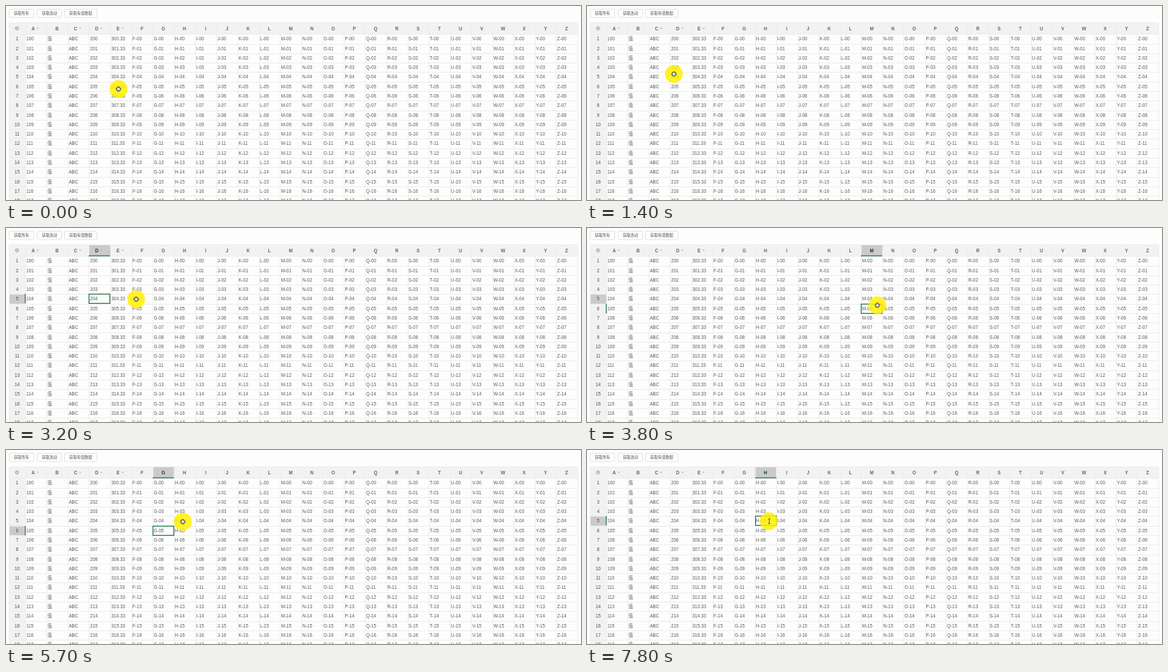
These frames come from a looping animation (800x271 px, 8000 ms). An HTML page with a canvas:

```html
<!DOCTYPE html>
<html>
<head>
<meta charset="utf-8">
<style>
html, body { margin: 0; width: 100%; height: 100%; overflow: hidden; background: #fff; }
canvas { display: block; }
</style>
</head>
<body>
<canvas id="stage" width="800" height="271"></canvas>
<script>
const ctx = document.getElementById('stage').getContext('2d');
const LOOP = 8000, STEP = 100, EDIT_AT = 6500;
const LEFT = 5, COL0 = 26.8, COL_W = 29.54, TOP = 24, ROW0 = 39.3, ROW_H = 13.28;
const COLS = 26, ROWS = 18;
const GREEN = '#217346', LINE = '#eeedee', HEAD = '#f3f2f3', ACTIVE = '#cacaca';
const LATIN = '"Liberation Sans", Arial, sans-serif';
const CJK = '"Noto Sans CJK SC", "Noto Sans CJK", sans-serif';

// key points of the pointer: time, x, y
const path = [
  [0, 156.5, 116], [400, 169, 111], [800, 164, 109], [1100, 164, 109],
  [1400, 121, 95], [2600, 122, 96.7], [3400, 192, 100], [3800, 404, 108],
  [4300, 372, 144], [4700, 209.5, 107.3], [5200, 249, 100.5], [5700, 246, 100.2],
  [6600, 250, 105], [7000, 252, 99.5], [LOOP, 253, 99.5]
];
// each click selects the cell under the pointer
const clicks = [1900, 3800, 4300, 4700, 5900];

const colX = c => COL0 + c * COL_W;
const rowY = r => ROW0 + r * ROW_H;
const letter = c => String.fromCharCode(65 + c);

function pointer(t) {
  const i = path.findIndex(p => p[0] > t);
  const [t0, x0, y0] = path[i - 1], [t1, x1, y1] = path[i];
  const u = (t - t0) / (t1 - t0), e = u * u * (3 - 2 * u);
  return [x0 + (x1 - x0) * e, y0 + (y1 - y0) * e];
}

function selectedAt(t) {
  const click = clicks.filter(c => c <= t).pop();
  if (!click) return null;
  const [x, y] = pointer(click);
  return { col: Math.floor((x - COL0) / COL_W), row: Math.floor((y - ROW0) / ROW_H) };
}

function rect(x, y, w, h, color) {
  ctx.fillStyle = color;
  ctx.fillRect(x, y, w, h);
}

function text(s, x, y, size, color, align = 'left', font = LATIN, weight = '') {
  ctx.font = `${weight} ${size}px ${font}`;
  ctx.textAlign = align;
  ctx.fillStyle = color;
  ctx.fillText(s, x, y);
}

function button(label, x, w) {
  ctx.strokeStyle = '#e4e4e4';
  ctx.lineWidth = 1;
  ctx.beginPath();
  ctx.roundRect(x + 0.5, 4.5, w, 11.5, 1.5);
  ctx.stroke();
  text(label, x + 0.5 + w / 2, 12.2, 5.3, '#555', 'center', CJK);
}

function cellText(c, r) {
  const n = String(r).padStart(2, '0');
  return ['1' + n, '值', 'ABC', '2' + n, `3${n}.33`][c] || `${letter(c)}-${n}`;
}

function corner() {
  ctx.strokeStyle = '#888';
  ctx.lineWidth = 0.8;
  ctx.beginPath();
  for (let i = 0; i < 8; i++) {
    const a = i * Math.PI / 4, x = Math.cos(a), y = Math.sin(a);
    ctx.moveTo(15.3 + x * 1.8, 31.3 + y * 1.8);
    ctx.lineTo(15.3 + x * 3, 31.3 + y * 3);
  }
  ctx.moveTo(16.9, 31.3);
  ctx.arc(15.3, 31.3, 1.6, 0, 7);
  ctx.stroke();
}

function sortMark(x) {
  ctx.fillStyle = '#bbb';
  ctx.beginPath();
  ctx.moveTo(x - 1.8, 30.6);
  ctx.lineTo(x + 1.8, 30.6);
  ctx.lineTo(x, 32.6);
  ctx.fill();
}

function sheet(pick, greyRow) {
  const right = colX(COLS);
  rect(LEFT, TOP, right - LEFT, ROW0 - TOP, HEAD);
  rect(LEFT, TOP, COL0 - LEFT, 271, HEAD);
  if (pick) rect(colX(pick.col), TOP, COL_W, ROW0 - TOP, ACTIVE);
  if (greyRow >= 0) rect(LEFT, rowY(greyRow), COL0 - LEFT, ROW_H, ACTIVE);

  rect(LEFT, TOP - 1, right - LEFT, 1, LINE);
  rect(LEFT - 1, TOP - 1, 1, 271, LINE);
  for (let c = 0; c <= COLS; c++) rect(Math.round(colX(c)), TOP, 1, 271, LINE);
  for (let r = 0; r <= ROWS; r++) rect(LEFT, Math.round(rowY(r)), right - LEFT, 1, LINE);

  corner();
  for (let c = 0; c < COLS; c++) {
    const mid = colX(c) + COL_W / 2, sorted = c < 5 && c !== 1;
    const color = pick && pick.col === c ? '#1c3a28' : '#666';
    text(letter(c), mid - (sorted ? 3.8 : 0), 33.6, 6.4, color, 'center', LATIN, 'bold');
    if (sorted) sortMark(mid + 2.6);
    for (let r = 0; r < ROWS; r++)
      text(cellText(c, r), colX(c) + 1.5, rowY(r) + 9, 6.3, '#5c5c5c', 'left', c === 1 ? CJK : LATIN);
  }
  for (let r = 0; r < ROWS; r++) text(r + 1, 15.5, rowY(r) + 9, 6.4, '#505050', 'center');
}

function selection({ col, row }) {
  const x = Math.round(colX(col)), y = Math.round(rowY(row));
  rect(x, ROW0 - 1, COL_W, 1.2, GREEN);
  rect(COL0 - 0.6, y, 1.2, ROW_H, GREEN);
  ctx.strokeStyle = GREEN;
  ctx.lineWidth = 1.2;
  ctx.strokeRect(x + 0.5, y + 0.3, 29, 13);
}

function halo(x, y) {
  ctx.fillStyle = 'rgba(255, 241, 0, 0.85)';
  ctx.beginPath();
  ctx.arc(x, y, 12.4, 0, 7);
  ctx.fill();
}

function plus(x, y) {
  for (const [a, b, color] of [[3.4, 1.6, '#222'], [2.6, 0.8, '#fff']]) {
    rect(x - a, y - b, 2 * a, 2 * b, color);
    rect(x - b, y - a, 2 * b, 2 * a, color);
  }
}

function beam(x, y) {
  rect(x - 0.4, y - 3.5, 0.8, 7, '#444');
  for (const dy of [-3.8, 3]) rect(x - 1.5, y + dy, 3, 0.8, '#444');
}

function draw(t) {
  const pick = selectedAt(t), before = selectedAt(t - STEP), [x, y] = pointer(t);
  rect(0, 0, 800, 271, '#fefdfe');
  button('获取所有', 4, 34);
  button('获取改动', 43, 34);
  button('获取有值数据', 81, 45);
  // the row heading follows one step after the cell
  sheet(pick, before ? before.row : -1);
  if (pick) selection(pick);
  halo(x, y);
  if (t >= EDIT_AT) beam(x + 0.7, y);
  else plus(x, y);
}

function tick() {
  const t = performance.now() % LOOP;
  draw(Math.floor(t / STEP) * STEP);
  requestAnimationFrame(tick);
}
tick();
</script>
</body>
</html>
```
